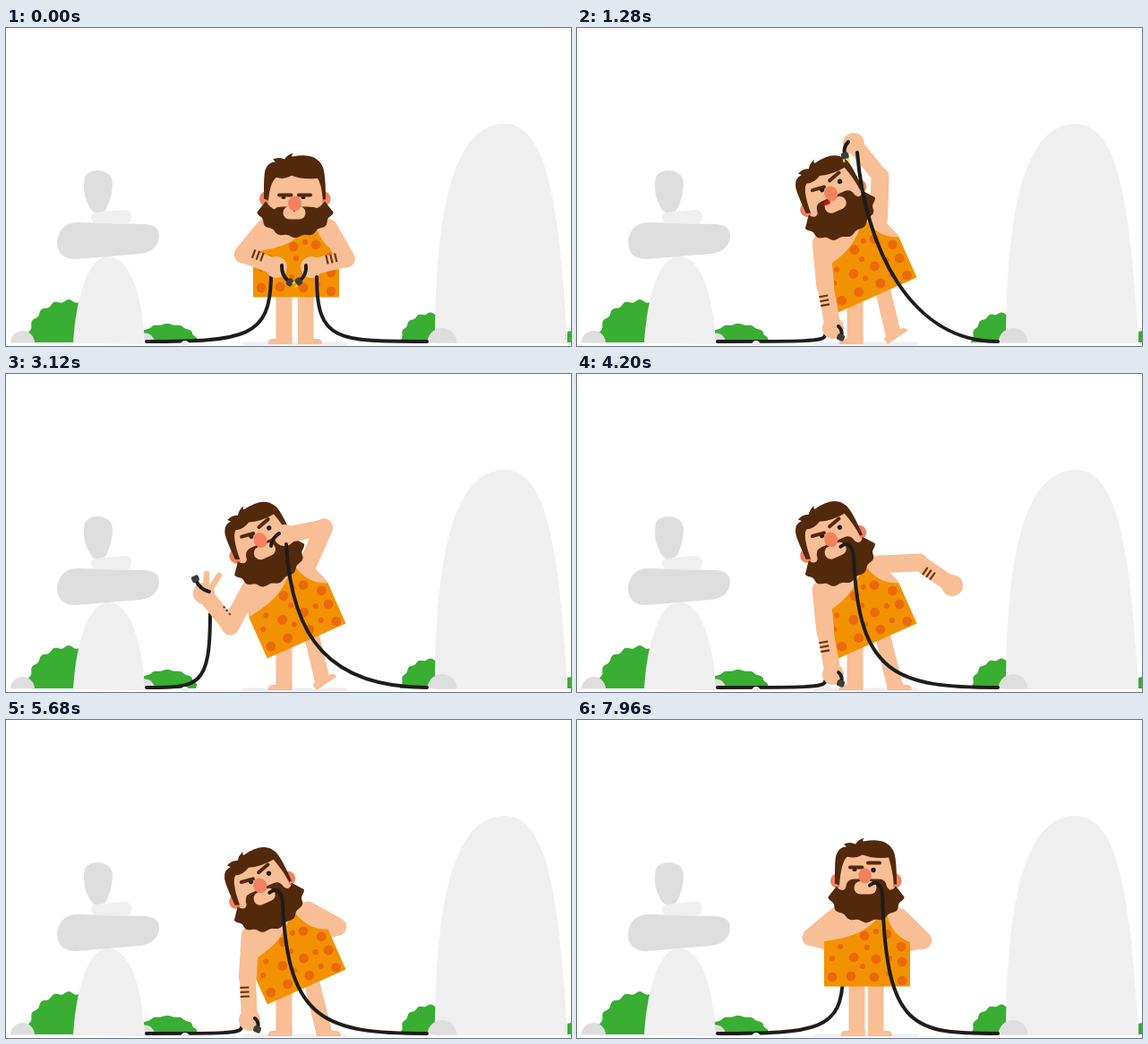
Animation, 631 px wide and 355 px high, one loop 8 s. Source, as an HTML page with a canvas:

```html
<!DOCTYPE html>
<html lang="en">
<head>
<meta charset="utf-8">
<title>Caveman and cables</title>
<style>
html, body { margin: 0; width: 100%; height: 100%; overflow: hidden; background: #fff; }
canvas { display: block; width: 631px; height: 355px; }
</style>
</head>
<body>
<canvas></canvas>
<script>
const W = 631, H = 355, LOOP = 8000, FLOOR = 350;
const SKIN = '#f8be95', HAIR = '#52290b', TUNIC = '#f39200', SPOT = '#ea690b',
  NOSE = '#f2825f', GREEN = '#3aad33', PALE = '#efefef', GREY = '#dedede', CABLE = '#1d1d1b';
const canvas = document.querySelector('canvas');
const ctx = canvas.getContext('2d');
const dpr = window.devicePixelRatio || 1;
canvas.width = W * dpr;
canvas.height = H * dpr;

// hand: place on stage; bend: elbow side; len: bone length;
// wire: where the long cable leaves the hand; tip: plug end; curl: bow of the short end.
const LEFT = {
  front: { hand: [302, 267], bend: 1, len: 40, wire: [-6, 11], tip: [14, 16], curl: 5, band: [0, 10], sway: 0 },
  ground: { hand: [279, 335], bend: 0.2, len: 49, wire: [-9, 8], tip: [9, 9], curl: -4, band: [-9, 1], sway: 1 },
  wave: { hand: [221, 245], bend: -1, len: 47, wire: [7, 23], tip: [-9, -15], curl: -5, band: [-9, -7], sway: 0 },
  back: { hand: [297, 253], bend: 1, len: 37, wire: [0, 32], tip: [9, 9], curl: -4, band: [-9, 1], sway: 0 }
};
const RIGHT = {
  front: { hand: [341, 267], bend: -1, len: 40, wire: [6, 11], tip: [-13, 15], curl: -5 },
  lift: { hand: [309, 129], bend: 1, len: 47, wire: [4, 10], tip: [-10, 12], curl: 4 },
  bite: { hand: [311, 180], bend: 1, len: 45, wire: [2, 10], tip: [-15, 12], curl: 4 },
  fling: { hand: [398, 146], bend: 0, len: 46, wire: [2, 10], tip: [-15, 12], curl: 4 },
  droop: { hand: [419, 236], bend: -1, len: 45, wire: [2, 10], tip: [-15, 12], curl: 4 },
  tuck: { hand: [335, 245], bend: -1, len: 38, wire: [2, 10], tip: [-15, 12], curl: 4 },
  back: { hand: [350, 253], bend: -1, len: 37, wire: [2, 10], tip: [-15, 12], curl: 4 }
};
const LEFT_BEATS = [[120, 'front'], [800, 'ground'], [2560, 'ground'], [2900, 'wave'], [3360, 'wave'],
  [3700, 'ground'], [5940, 'ground'], [6560, 'back']];
const RIGHT_BEATS = [[120, 'front'], [760, 'lift'], [1360, 'lift'], [1700, 'bite'], [3420, 'bite'],
  [3660, 'fling'], [4150, 'droop'], [4240, 'droop'], [4720, 'tuck'], [5940, 'tuck'], [6560, 'back']];

function ramp(t, a, b) {
  const k = Math.min(1, Math.max(0, (t - a) / (b - a)));
  return k * k * (3 - 2 * k);
}

const pulse = (t, a, b, c, d) => ramp(t, a, b) - ramp(t, c, d);

const mix = (a, b, k) => Array.isArray(a) ? a.map((v, i) => mix(v, b[i], k)) : a + (b - a) * k;

function poseAt(poses, beats, t) {
  let i = 0;
  while (i < beats.length - 2 && t >= beats[i + 1][0]) i++;
  const [t0, from] = beats[i], [t1, to] = beats[i + 1];
  const k = ramp(t, t0, t1), out = {};
  for (const key in poses[from]) out[key] = mix(poses[from][key], poses[to][key], k);
  return out;
}

function fillPath(d, color) {
  ctx.fillStyle = color;
  ctx.fill(new Path2D(d));
}

function oval(x, y, rx, ry, color) {
  ctx.fillStyle = color;
  ctx.beginPath();
  ctx.ellipse(x, y, rx, ry, 0, 0, Math.PI * 2);
  ctx.fill();
}

function pill(x, y, w, h, r, color) {
  ctx.fillStyle = color;
  ctx.beginPath();
  ctx.roundRect(x, y, w, h, r);
  ctx.fill();
}

function dome(x, r, color, base = 351.5) {
  ctx.fillStyle = color;
  ctx.beginPath();
  ctx.arc(x, base, r, Math.PI, 0);
  ctx.fill();
}

function line(x1, y1, x2, y2, w, color, cap = 'round') {
  ctx.strokeStyle = color;
  ctx.lineWidth = w;
  ctx.lineCap = cap;
  ctx.beginPath();
  ctx.moveTo(x1, y1);
  ctx.lineTo(x2, y2);
  ctx.stroke();
}

// Adds a wavy elliptical arc to the current path.
function scallop(cx, cy, rx, ry, waves, depth, from, to) {
  for (let i = 0; i <= 120; i++) {
    const a = from + (to - from) * i / 120;
    const r = 1 + depth * Math.cos(waves * (a - Math.PI / 2));
    ctx.lineTo(cx + rx * r * Math.cos(a), cy + ry * r * Math.sin(a));
  }
}

function bush(x, rx, ry, waves) {
  ctx.fillStyle = GREEN;
  ctx.beginPath();
  scallop(x, 351, rx, ry, waves, 0.03, Math.PI, Math.PI * 2);
  ctx.fill();
}

function scenery() {
  bush(70, 46, 46.5, 18);
  bush(180, 33, 20.5, 14);
  bush(474, 33, 32.5, 16);
  fillPath('M627 339L631 338V351H627Z', GREEN);
  dome(155, 11, GREY);
  dome(18.5, 13.5, GREY);
  fillPath('M75 352C78 300 92 255 114 255C140 255 153 305 155 353Z', PALE);
  fillPath('M80 217L155 219Q171 220 171 232Q170 249 150 252L78 258Q57 258 57 238Q60 217 80 217Z', GREY);
  fillPath('M103 159Q119 160 119 175Q118 190 112 202Q110 206 103 206L99 206Q93 203 88 187Q86 175 88 167Q91 159 103 159Z', GREY);
  fillPath('M100 206L132 203Q140 203 140 211Q140 219 130 219L102 218Q95 217 95 211Q96 206 100 206Z', PALE);
  fillPath('M479 352C479 210 498 107 557 107C605 107 618 200 627 352Z', PALE);
  dome(487, 16.5, GREY);
  pill(264, 350.5, 117, 4, 2, PALE);
}

function foot(x, dir, angle) {
  ctx.save();
  ctx.translate(x, 353);
  ctx.rotate(angle);
  ctx.scale(dir, 1);
  fillPath('M0 0V-8H16L18 -6H23Q27 -5 27 0Z', SKIN);
  ctx.restore();
}

function legs(p) {
  const leftX = 301.5 + 2 * p.stand;
  const top = mix(326, 331, p.tilt) - p.stand, heel = mix(326, 347, p.tilt) - p.stand;
  ctx.fillStyle = SKIN;
  ctx.fillRect(leftX, 285, 18, 66);
  ctx.beginPath();
  ctx.moveTo(top, 285);
  ctx.lineTo(top + 17.5, 285);
  ctx.lineTo(heel + 17.5 * Math.cos(p.toe), 349 + 17.5 * Math.sin(p.toe));
  ctx.lineTo(heel, 353);
  ctx.fill();
  foot(leftX + 18, -1, 0);
  foot(heel, 1, p.toe);
}

const hips = p => [324 + 11.7 * p.tilt, 297.5 + 3 * p.bow + 0.5 * p.tilt];

function inBody(p, draw) {
  ctx.save();
  ctx.translate(...hips(p));
  ctx.rotate(-p.angle);
  ctx.translate(-324, -297.5);
  draw();
  ctx.restore();
}

function toStage(p, x, y) {
  const [hx, hy] = hips(p), c = Math.cos(p.angle), s = Math.sin(p.angle);
  const dx = x - 324, dy = y - 297.5;
  return [hx + dx * c + dy * s, hy - dx * s + dy * c];
}

const BIG_SPOTS = [[285, 287], [306, 286], [332, 287], [363, 291], [309, 265], [334, 267], [363, 270],
  [362, 253], [346, 239], [321, 241]];
const SMALL_SPOTS = [[285, 266], [294, 253], [348, 283], [349, 266], [334, 236], [319, 275], [324, 254]];

function torso() {
  fillPath('M292 207L358 207L372 245V262H276V246L283 220Z', SKIN);
  const cloth = new Path2D('M276 247C305 243 322 238 340 217L346 217Q352 241 372 248V297.5H276Z');
  ctx.fillStyle = TUNIC;
  ctx.fill(cloth);
  ctx.save();
  ctx.clip(cloth);
  for (const [x, y] of BIG_SPOTS) oval(x, y, 5.4, 5.4, SPOT);
  for (const [x, y] of SMALL_SPOTS) oval(x, y, 3.1, 3.1, SPOT);
  ctx.restore();
}

function beard(y) {
  ctx.fillStyle = HAIR;
  ctx.beginPath();
  ctx.moveTo(356, 185);
  scallop(323, 190, 42, 34.5, 14, 0.035, 0.2, Math.PI - 0.2);
  ctx.lineTo(290, 185);
  ctx.quadraticCurveTo(296, 193, 300, mix(189, y(185), 0.5));
  ctx.quadraticCurveTo(301, y(177), 309, y(177));
  ctx.lineTo(337, y(177));
  ctx.quadraticCurveTo(345, y(177), 346, mix(187, y(184), 0.5));
  ctx.quadraticCurveTo(350, 193, 356, 185);
  ctx.fill();
}

function head(p, t) {
  const drop = 14 * p.bow, g = p.glare, w = p.wink;
  const y = v => v + drop, fringe = v => v + drop * 0.45;
  const mouthY = 179.5 + 11 * p.bow;
  ctx.save();
  ctx.translate(0, 5.5 * p.bow + 0.5 * Math.sin(t / 240));
  for (const x of [290.5, 355]) oval(x, 179 + 3 * p.bow, 7.5, 8, NOSE);
  fillPath('M293 147H353V188Q350 208 323 210Q296 208 293 188Z', SKIN);
  fillPath(`M288 182C288 165 288 153 290 149Q293 141 301 141L298 138Q305 135 311 138Q314 133 321 131
    Q318 134 320 135Q345 130 353 145Q357 151 357 183L354 183Q352 165 348 ${fringe(153)}
    Q332 ${fringe(155)} 319 ${fringe(150)}Q310 ${fringe(155)} 302 ${fringe(152)}Q295 ${fringe(157)} 293 184Z`, HAIR);
  beard(y);
  pill(309.5, mouthY, 25, 14.5, 7, SKIN);
  if (p.bow > 0.5) oval(322, mouthY + 5, 1, 1.2, HAIR);
  if (t > 640 && t < 1640) oval(314, 181, 4, 2.3, '#e30613');

  oval(mix(310, 315, g), y(mix(167, 165.5, g)), 2.6, mix(1.4, 2.6, g), CABLE);
  oval(mix(332, 337, g) - w, y(mix(167, 165, g)), 2.7, mix(1.4, 2.7, Math.max(g, w)), CABLE);
  line(305, y(mix(164, 161.5, g)), 318.5, y(mix(164, 163.5, g)), 4, HAIR);
  line(327 - 2 * w, y(mix(164, 159.5, g) - 5 * w), 340 - 2 * w, y(mix(164, 155.7, g) - 5 * w), 4, HAIR);
  oval(322.5 - w, y(173.5), 7.4, 8.5, NOSE);
  ctx.restore();
}

// Two equal bones from the shoulder to the hand.
function makeArm(pose, shoulder) {
  const [sx, sy] = shoulder, [hx, hy] = pose.hand;
  const dx = hx - sx, dy = hy - sy, d = Math.hypot(dx, dy) || 1;
  const out = pose.bend * Math.sqrt(Math.max(0, pose.len ** 2 - d * d / 4)) / d;
  return { ...pose, shoulder, elbow: [sx + dx / 2 - dy * out, sy + dy / 2 + dx * out] };
}

const upperArm = a => line(...a.shoulder, ...a.elbow, 20, SKIN);

function forearm(a) {
  const [ex, ey] = a.elbow, [hx, hy] = a.hand;
  line(ex, ey, hx, hy, 18, SKIN);
  oval(hx, hy, 12, 12, SKIN);
  if (!a.band) return;
  const d = Math.hypot(hx - ex, hy - ey) || 1;
  const dx = (hx - ex) / d, dy = (hy - ey) / d, [from, to] = a.band;
  for (let s = 11; s < 24; s += 5) {
    const x = ex + dx * s, y = ey + dy * s;
    line(x + dy * from, y - dx * from, x + dy * to, y - dx * to, 2.2, '#6b3410', 'butt');
  }
}

function strokeCable(build) {
  ctx.strokeStyle = CABLE;
  ctx.lineWidth = 4;
  ctx.lineCap = ctx.lineJoin = 'round';
  ctx.beginPath();
  build();
  ctx.stroke();
}

function shortEnd(a, side, showPlug, prongs) {
  const [hx, hy] = a.hand, x0 = hx + 6 * side, y0 = hy - 2;
  const x1 = hx + a.tip[0], y1 = hy + a.tip[1];
  const d = Math.hypot(x1 - x0, y1 - y0) || 1;
  const cx = (x0 + x1) / 2 - (y1 - y0) / d * a.curl, cy = (y0 + y1) / 2 + (x1 - x0) / d * a.curl;
  strokeCable(() => {
    ctx.moveTo(x0, y0);
    ctx.quadraticCurveTo(cx, cy, x1, y1);
  });
  if (!showPlug) return;
  ctx.save();
  ctx.translate(x1, y1);
  ctx.rotate(Math.atan2(y1 - cy, x1 - cx));
  if (prongs) {
    for (const y of [-3.5, 1.3]) pill(4, y, 4.5, 2.2, 0, '#ffd500');
  }
  pill(-2, -4.2, 7, 8.4, 2, '#3c3c3b');
  ctx.restore();
}

// The longer the span, the tauter the cable hangs.
function hang(x, y, endX, extra = 0) {
  const stretch = Math.max(0, Math.hypot(endX - x, FLOOR - y) - 142);
  const slack = Math.min(1, 1 - stretch / 240 + extra);
  const lean = Math.sign(endX - x) * stretch * 0.07;
  ctx.bezierCurveTo(x + lean, mix(y, FLOOR, slack), mix(x, endX, 0.18 + stretch * 0.0016), FLOOR, endX, FLOOR);
}

function leftCable(a) {
  const x = a.hand[0] + a.wire[0], y = a.hand[1] + a.wire[1];
  strokeCable(() => {
    ctx.moveTo(x, y);
    hang(x, y, 157);
  });
}

function rightCable(p, a, t, plugged) {
  const [mx, my] = toStage(p, 329 - 2 * p.wink, 184.5);
  const held = [a.hand[0] + a.wire[0], a.hand[1] + a.wire[1]];
  const loose = [mx + 14 + 0.8 * Math.sin(t / 210), my + 12];
  const [x, y] = plugged ? loose : held;
  strokeCable(() => {
    if (plugged) {
      ctx.moveTo(mx, my);
      ctx.bezierCurveTo(mx + 8, my - 6, x - 1, y - 14, x, y);
    } else {
      ctx.moveTo(x, y);
    }
    hang(x, y, 470, 0.22 * ramp(t, 3480, 3760));
  });
}

function render(t) {
  const p = {
    tilt: 1 - ramp(t, 5980, 6520) - (1 - ramp(t, 120, 720)),
    bow: 1 - ramp(t, 80, 520),
    stand: ramp(t, 6000, 6500),
    toe: -0.6 * pulse(t, 700, 960, 3360, 3600),
    glare: pulse(t, 200, 620, 6060, 6480),
    wink: ramp(t, 7600, 7760),
    open: pulse(t, 2640, 2880, 3380, 3600)
  };
  p.angle = p.tilt * 24 * Math.PI / 180;

  const left = poseAt(LEFT, LEFT_BEATS, t), right = poseAt(RIGHT, RIGHT_BEATS, t);
  left.hand[0] += left.sway * 7 * Math.cos((t - 4200) / 1480 * Math.PI);
  if (t < 560 || t > 3720) right.band = [-9, 1];
  const armL = makeArm(left, toStage(p, 290, 219)), armR = makeArm(right, toStage(p, 360, 220));
  const hideL = t > 6380, hideR = t > 4560, plugged = t > 3480;

  ctx.setTransform(dpr, 0, 0, dpr, 0, 0);
  ctx.fillStyle = '#fff';
  ctx.fillRect(0, 0, W, H);
  scenery();
  if (hideL) leftCable(armL);
  legs(p);
  for (const [arm, hidden] of [[armL, hideL], [armR, hideR]]) {
    if (!hidden) continue;
    upperArm(arm);
    forearm({ ...arm, band: null });
  }
  inBody(p, torso);
  if (!hideR) upperArm(armR);
  if (!hideL) upperArm(armL);
  inBody(p, () => head(p, t));

  if (!hideL) {
    leftCable(armL);
    if (p.open > 0) {
      const [x, y] = armL.hand;
      line(x + 2, y, x + 3, y - 22 * p.open, 6.5, SKIN);
      line(x + 4, y, x + 17 * p.open, y - 20 * p.open, 6.5, SKIN);
    }
    forearm(armL);
    shortEnd(armL, 1, true, false);
  }
  if (!hideR) forearm(armR);
  if (!plugged) shortEnd(armR, -1, t < 1620, true);
  rightCable(p, armR, t, plugged);
  dome(200, 5, PALE, 354);
}

function frame(now) {
  render(now % LOOP);
  requestAnimationFrame(frame);
}
render(0);
requestAnimationFrame(frame);
</script>
</body>
</html>
```
